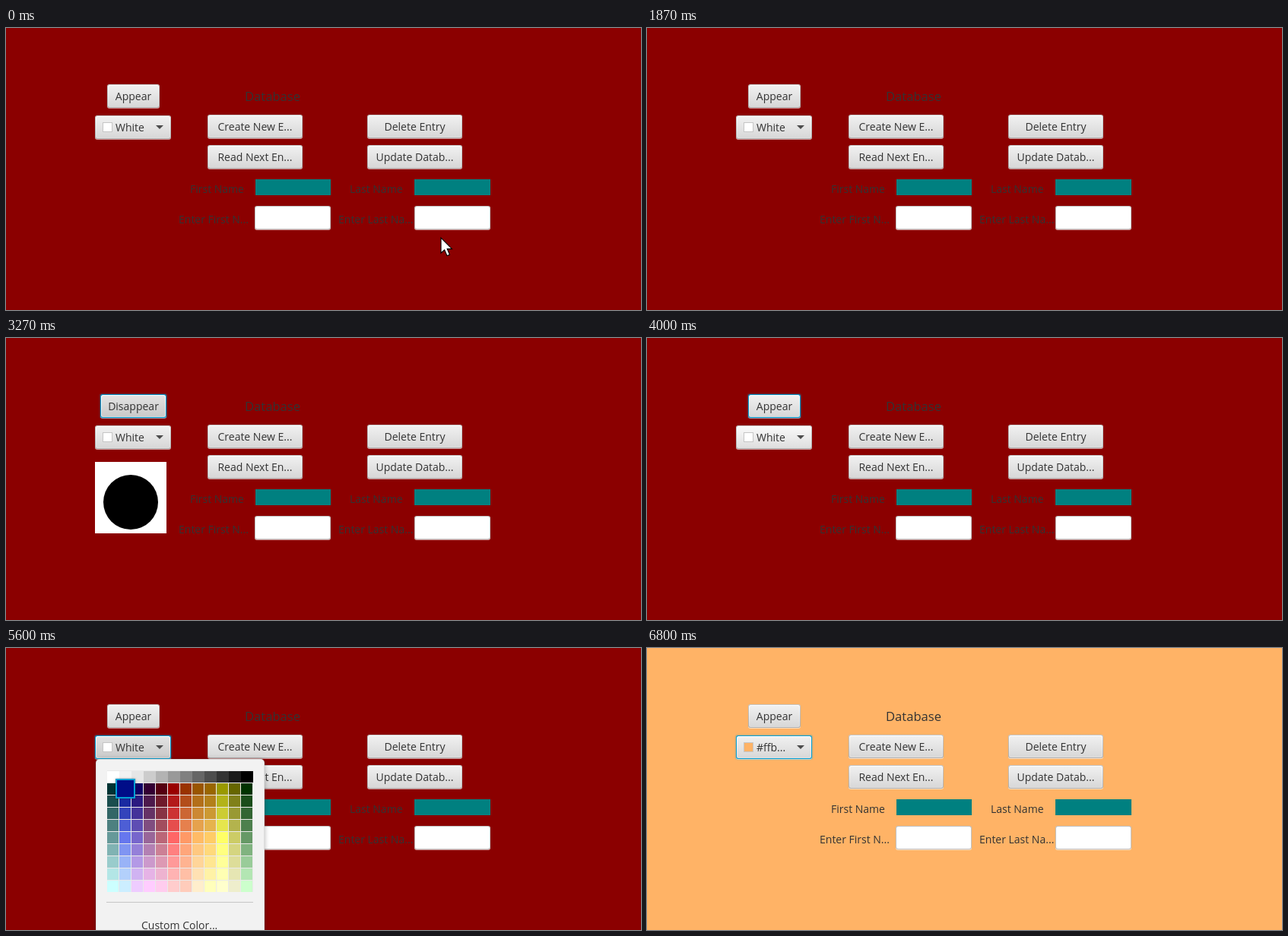
An HTML page that plays this animation: 835 by 371 pixels, repeating every 8 s.

```html
<!DOCTYPE html>
<html lang="en">
<head>
<meta charset="utf-8">
<title>Database form</title>
<style>
  html, body { margin: 0; width: 100%; height: 100%; overflow: hidden; background: #8b0000; }
  svg { display: block; width: 835px; height: 371px; }
  text { font: 14px "Open Sans", "Noto Sans", sans-serif; fill: #333; white-space: pre; }
  .mid { text-anchor: middle; }
  .title { font-size: 16.6px; }
</style>
</head>
<body>
<svg id="stage" viewBox="0 0 835 371">
  <defs>
    <linearGradient id="edge" x2="0" y2="1"><stop stop-color="#c4c4c4"/><stop offset="1" stop-color="#adadad"/></linearGradient>
    <linearGradient id="rim" x2="0" y2="1"><stop stop-color="#fdfdfd"/><stop offset="1" stop-color="#dedede"/></linearGradient>
    <linearGradient id="normal" x2="0" y2="1"><stop stop-color="#f0f0f0"/><stop offset="1" stop-color="#d8d8d8"/></linearGradient>
    <linearGradient id="hover" x2="0" y2="1"><stop stop-color="#f9f9f9"/><stop offset="1" stop-color="#dfdfdf"/></linearGradient>
    <linearGradient id="press" x2="0" y2="1"><stop stop-color="#e2e2e2"/><stop offset="1" stop-color="#cacaca"/></linearGradient>
    <filter id="drop" x="-20%" y="-20%" width="140%" height="140%">
      <feDropShadow dx="0" dy="1" stdDeviation="3" flood-opacity=".3"/>
    </filter>
    <filter id="lift" x="-30%" y="-30%" width="160%" height="160%">
      <feDropShadow dx="0" dy="0" stdDeviation="1.5" flood-opacity=".35"/>
    </filter>
  </defs>
</svg>
<script>
const LOOP = 8000;
const FOCUS = '#039ed3';
const stage = document.getElementById('stage');

function add(parent, tag, attrs, text) {
  const el = document.createElementNS('http://www.w3.org/2000/svg', tag);
  set(el, attrs);
  if (text) el.textContent = text;
  return parent.appendChild(el);
}
function set(el, attrs) {
  for (const key in attrs) el.setAttribute(key, attrs[key]);
}
const show = (el, on) => set(el, { visibility: on ? 'visible' : 'hidden' });
const rect = (parent, x, y, width, height, fill, rx = 0) =>
  add(parent, 'rect', { x, y, width, height, fill, rx });
const label = (x, y, text, cls = '') => add(stage, 'text', { x, y, class: cls }, text);

function button(x, y, w, h, text) {
  const g = add(stage, 'g', {});
  rect(g, x, y + 1, w, h, 'rgba(255,255,255,.6)', 3);
  const glow = rect(g, x - 1.5, y - 1.5, w + 3, h + 3, 'rgba(3,158,211,.2)', 4);
  const edge = rect(g, x, y, w, h, 'url(#edge)', 3);
  rect(g, x + 1, y + 1, w - 2, h - 2, 'url(#rim)', 2.5);
  const body = rect(g, x + 2, y + 2, w - 4, h - 4, 'url(#normal)', 2);
  if (text) add(g, 'text', { x: x + w / 2, y: y + 21, class: 'mid' }, text);
  return { g, paint(tone, focus) {
    set(body, { fill: `url(#${tone})` });
    set(edge, { fill: focus ? FOCUS : 'url(#edge)' });
    set(glow, { opacity: focus ? 1 : 0 });
  } };
}
function field(x, y) {
  rect(stage, x, y + 1, 100, 31, 'rgba(255,255,255,.6)', 3);
  rect(stage, x, y, 100, 31, '#c0c0c0', 3);
  rect(stage, x + 1, y + 1, 98, 29, '#fff', 2.5);
}

const back = rect(stage, 0, 0, 835, 371, '#8b0000');
label(314, 96, 'Database', 'title');
label(242, 217, 'First Name');
label(452, 217, 'Last Name');
label(227, 257, 'Enter First N...');
label(437, 257, 'Enter Last Na...');
rect(stage, 328, 199, 99, 21, '#008080');
rect(stage, 537, 199, 100, 21, '#008080');
field(327, 234);
field(537, 234);

const plain = [
  button(265, 114, 125, 31, 'Create New E...'),
  button(475, 114, 125, 31, 'Delete Entry'),
  button(265, 154, 125, 31, 'Read Next En...'),
  button(475, 154, 125, 31, 'Update Datab...')
];
plain.forEach(b => b.paint('normal', false));
const appear = button(133, 74, 69, 31, 'Appear');
const vanish = button(124, 74, 87, 31, 'Disappear');

const picture = add(stage, 'g', {});
rect(picture, 117, 163, 94, 94, '#fff');
add(picture, 'circle', { cx: 164, cy: 216, r: 36, fill: '#000' });

const combo = button(117, 115, 100, 31);
rect(combo.g, 127, 124, 13, 13, '#c6c6c6');
const swatch = rect(combo.g, 128, 125, 11, 11, '#fff');
const choice = add(combo.g, 'text', { x: 144, y: 136 }, 'White');
add(combo.g, 'path', { d: 'M197 128h10l-5 5z', fill: '#4c4c4c' });

// Colour popup: two ramps per column, base to vivid to pastel
const BASE = '033 018 106 303 501 900 930 950 960 990 660 030'.split(' ');
const PASTEL = 'cff cef ecf fcf fce fcc fcb fec ffb ffc eec cfc'.split(' ');
const GREYS = [255, 242, 230, 204, 179, 153, 128, 102, 77, 51, 26, 0];
const rgb = hex => [...hex].map(d => parseInt(d, 16) * 17);
function cellColor(c, r) {
  if (!r) return `rgb(${GREYS[c]},${GREYS[c]},${GREYS[c]})`;
  const end = rgb(PASTEL[c]);
  const mix = rgb(BASE[c]).map((v, i) => {
    const vivid = Math.min(255, v + 25.5 * Math.min(r - 1, 4));
    return Math.round(vivid + (end[i] - vivid) * Math.max(0, r - 5) / 4);
  });
  return `rgb(${mix})`;
}

const popup = add(stage, 'g', {});
set(rect(popup, 118, 146, 222, 250, '#c8c8c8', 5), { filter: 'url(#drop)' });
rect(popup, 118.5, 146.5, 221, 250, '#f2f2f2', 5);
rect(popup, 133, 161, 192, 160, '#e9e9e9');
for (let r = 0; r < 10; r++)
  for (let c = 0; c < 12; c++)
    rect(popup, 133 + 16 * c, 162 + 16 * r, r ? 15 : 16, 15, cellColor(c, r));
rect(popup, 132, 334, 193, 1, '#c6c6c6');
add(popup, 'text', { x: 178, y: 370 }, 'Custom Color...');
const picked = rect(popup, 0, 0, 24, 24, '#fff');
set(picked, { stroke: FOCUS, 'stroke-width': 2, filter: 'url(#lift)' });

const cursor = add(stage, 'path', {
  d: 'M0 0V20L4.6 15.8L8 23.6L11.4 22.2L8.2 14.6H14.4Z',
  fill: '#fff', stroke: '#000', 'stroke-width': 1.1
});

// Each step changes only what it names
const STEPS = [
  [0, { cursor: [572, 276], tone: 'normal', focus: '', comboTone: 'normal', on: false, cell: null, done: false }],
  [470, { cursor: [553, 283] }],
  [530, { cursor: [460, 281] }],
  [600, { cursor: [335, 268] }],
  [670, { cursor: [224, 249] }],
  [730, { cursor: [157, 233] }],
  [800, { cursor: null }],
  [1270, { comboTone: 'hover' }],
  [1870, { comboTone: 'normal' }],
  [1930, { tone: 'hover' }],
  [2270, { tone: 'press', focus: 'button' }],
  [2400, { tone: 'hover', on: true }],
  [3270, { tone: 'press' }],
  [3470, { tone: 'hover', on: false }],
  [3870, { tone: 'normal' }],
  [4000, { comboTone: 'hover' }],
  [4730, { comboTone: 'press', focus: 'combo' }],
  [4800, { cell: [0, 0] }],
  [5600, { cell: [1, 1] }],
  [5670, { cell: [3, 2] }],
  [5730, { cell: [5, 4] }],
  [5870, { cell: [7, 5] }],
  [6800, { cell: null, comboTone: 'normal', done: true }]
];

function draw(t) {
  const s = Object.assign({}, ...STEPS.filter(step => step[0] <= t).map(step => step[1]));
  const color = s.done ? '#ffb366' : '#8b0000';
  set(back, { fill: color });
  document.body.style.background = color;
  for (const b of [appear, vanish]) b.paint(s.tone, s.focus === 'button');
  show(appear.g, !s.on);
  show(vanish.g, s.on);
  show(picture, s.on);
  combo.paint(s.comboTone, s.focus === 'combo');
  set(swatch, { fill: s.done ? '#ffb366' : '#fff' });
  choice.textContent = s.done ? '#ffb...' : 'White';
  show(popup, s.cell);
  if (s.cell) {
    const [c, r] = s.cell;
    set(picked, { x: 129 + 16 * c, y: 157 + 16 * r, fill: cellColor(c, r) });
  }
  show(cursor, s.cursor);
  if (s.cursor) set(cursor, { transform: `translate(${s.cursor})` });
}

const start = performance.now();
function tick() {
  draw((performance.now() - start) % LOOP);
  requestAnimationFrame(tick);
}
tick();
</script>
</body>
</html>
```
